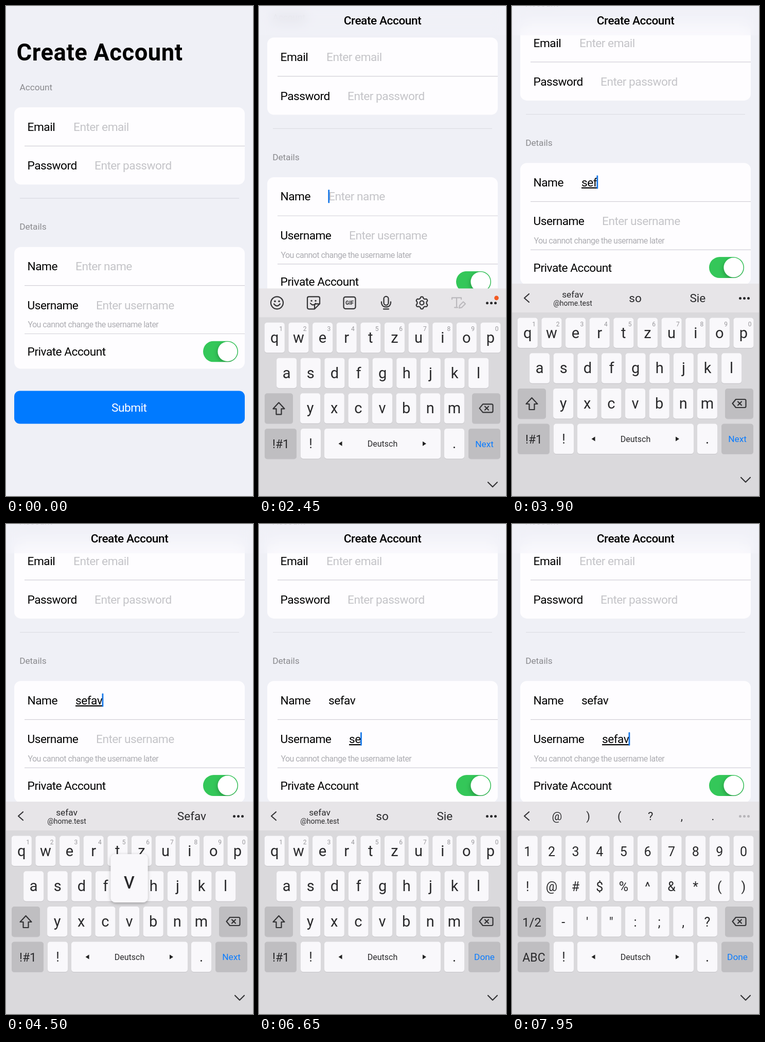
An HTML page for the animation above (8 s loop, 480 by 953 pixels).

```html
<!DOCTYPE html>
<html lang="en">
<head>
<meta charset="utf-8">
<title>Create Account</title>
<style>
html, body { margin: 0; width: 100%; height: 100%; overflow: hidden; background: #eff0f6; }
#stage { position: relative; width: 480px; height: 953px; overflow: hidden; font-family: Roboto, sans-serif; }
svg { position: absolute; left: 0; top: 0; font-family: Roboto, sans-serif; }
#bar { position: absolute; left: 0; top: 0; width: 480px; height: 57px; opacity: 0;
  background: rgba(243, 243, 249, .4); backdrop-filter: blur(13px); }
#barTitle { font-size: 22.67px; font-weight: 500; letter-spacing: -.45px; text-anchor: middle; }
.body { font-size: 22.67px; letter-spacing: -.5px; }
.head { font-size: 17.33px; fill: #8a8a8e; letter-spacing: -.1px; }
.hint { fill: #c4c4c8; }
.typed { text-decoration: underline; }
.mid { text-anchor: middle; fill: #29292b; }
.icon { fill: none; stroke: #333335; stroke-width: 2.2; stroke-linecap: round; stroke-linejoin: round; }
</style>
</head>
<body>
<div id="stage">
  <svg width="480" height="953">
    <defs>
      <filter id="soft" x="-30%" y="-30%" width="160%" height="160%">
        <feDropShadow dx="0" dy="2" stdDeviation="3" flood-opacity=".28"/>
      </filter>
      <filter id="knob" x="-40%" y="-40%" width="180%" height="180%">
        <feDropShadow dx="-1" dy="3" stdDeviation="4" flood-opacity=".25"/>
      </filter>
      <clipPath id="track"><rect x="383" y="651.5" width="68" height="41" rx="20.5"/></clipPath>
    </defs>
    <g id="page">
      <text x="20.6" y="106" font-size="45.33" font-weight="700" letter-spacing=".55">Create Account</text>
      <text class="head" x="26.6" y="164">Account</text>
      <text class="head" x="26.2" y="435.3">Details</text>
      <g fill="#fefdff">
        <rect x="16" y="197" width="448" height="150.3" rx="13"/>
        <rect x="16" y="468.7" width="448" height="236.8" rx="13"/>
      </g>
      <path d="M36 272.3H464M36 543.7H464M36 637.5H464" stroke="#d1d0d7" stroke-width="1.2"/>
      <path d="M27 374H453" stroke="#dddee4" stroke-width="1.3"/>
      <g class="body" id="labels"></g>
      <text x="42.4" y="625.3" font-size="16" letter-spacing="-.547" fill="#adadb2">You cannot change the username later</text>
      <g clip-path="url(#track)">
        <rect x="383" y="651.5" width="68" height="41" fill="#34c759"/>
        <circle cx="430.5" cy="672" r="19" fill="#fff" filter="url(#knob)"/>
      </g>
      <rect x="16" y="748.5" width="448" height="64" rx="11" fill="#007aff"/>
      <text class="body" x="239.3" y="788.7" text-anchor="middle" style="fill:#fff">Submit</text>
      <rect id="caret" width="2.8" height="26" rx="1" fill="#1677e8"/>
    </g>
  </svg>
  <div id="bar"></div>
  <svg width="480" height="953">
    <text id="barTitle" x="240" y="36">Create Account</text>
    <g id="keyboard">
      <rect y="540" width="480" height="57" fill="#e7e5e8"/>
      <rect y="596" width="480" height="357" fill="#dad9dc"/>
      <g id="strip"></g>
      <g id="keys"></g>
      <path class="icon" d="M445 917l9 9 9-9"/>
      <g id="popup"></g>
    </g>
  </svg>
</div>
<script>
const $ = id => document.getElementById(id);
const LOOP = 8000, SCROLL = 163.4, WORD = 'sefav', CAP = 'Sefav';
const FIELDS = [
  { id: 'name', x: 135, y: 514, times: [3350, 3550, 3780, 4150, 4450], from: 2150, to: 5300 },
  { id: 'user', x: 175, y: 589.5, times: [6250, 6500, 6800, 7150, 7500], from: 5300, to: LOOP }
];
const STRIPS = [[0, 'icons'], [3350, 'short'], [4200, 'long'], [4700, 'done'], [5300, 'icons'],
  [6250, 'short'], [7150, 'long'], [7550, 'done'], [7850, 'symbols']];
const CARET = [[0, 0], [2150, 1], [3050, 0], [3350, 1], [5000, 0], [5300, 1], [5750, 0], [6250, 1]];
const LETTERS = ['qwertzuiop', 'asdfghjkl', 'yxcvbnm'];
const SYMBOLS = ['1234567890', '!@#$%^&*()', '-\'":;,?'];
const ROW_Y = [606.5, 675.3, 744, 812.6], STEP = 46.63;

const esc = s => s.replace(/&/g, '&amp;').replace(/</g, '&lt;');
const text = (s, x, y, size, extra = '') =>
  `<text class="mid" x="${x}" y="${y}" font-size="${size}" ${extra}>${esc(s)}</text>`;
const key = (x, y, w, fill = '#f9f8fb') =>
  `<rect x="${x}" y="${y + 1}" width="${w}" height="58.5" rx="5" fill="#c5c4c8"/>` +
  `<rect x="${x}" y="${y}" width="${w}" height="58.5" rx="5" fill="${fill}"/>`;
const at = (table, t) => table.filter(([start]) => start <= t).pop();
const progress = (t, start, length) => Math.min(1, Math.max(0, (t - start) / length));
const easeOut = p => 1 - (1 - p) ** 3;

const rowStart = (rows, r) => r === 2 ? 99.6 : rows[r].length === 10 ? 30.3 : 53.6;

function keysMarkup(symbols, action, pressed) {
  const rows = symbols ? SYMBOLS : LETTERS;
  const grey = name => name === pressed ? '#a9a8ab' : '#bfbec1';
  let out = '';
  rows.forEach((row, r) => [...row].forEach((c, i) => {
    const x = rowStart(rows, r) + i * STEP, y = ROW_Y[r];
    out += key(x - 19.5, y, 39) + text(c, x, y + 39, symbols ? 25 : 29);
    if (!symbols && r === 0)
      out += text(String((i + 1) % 10), x + 12.2, y + 16, 12, 'style="fill:#98979b"');
  }));
  out += key(11, ROW_Y[2], 55, grey()) + key(414, ROW_Y[2], 55, grey());
  out += symbols ? text('1/2', 38.5, 782.5, 24)
    : '<path class="icon" d="M38.5 762l-11 12h6v11h10v-11h6z"/>';
  out += '<path class="icon" d="M435 765h17q2.500 0 2.500 2.500v11q0 2.500-2.500 2.500h-17l-6.500-8zM439 769.500l7 7m0-7l-7 7"/>';
  const y = ROW_Y[3];
  out += key(11, y, 62, grey('mode')) + key(81, y, 39) + key(127, y, 226) + key(360, y, 39) + key(407, y, 62, grey('action'));
  out += text(symbols ? 'ABC' : '!#1', 42.500, 850.5, 23) + text('!', 100.500, 851, 25) + text('.', 379.500, 851, 27);
  out += text('Deutsch', 240, 848, 16) + text(action, 438, 848.3, 17.3, 'style="fill:#0a7cff"');
  return out + '<path d="M154.500 842l7-4.500v9zM325 842l-7-4.500v9z" fill="#222"/>';
}

const dots = color => [443.5, 451.5, 459.5].map(x => `<circle cx="${x}" cy="568.5" r="2.5" fill="${color}"/>`).join('');

function gear() {
  const points = Array.from({ length: 72 }, (_, i) => {
    const a = i * Math.PI / 36, r = 10.4 + 1.5 * Math.tanh(2 * Math.cos(6 * a + Math.PI));
    return `${(316.5 + r * Math.cos(a)).toFixed(1)},${(568 + r * Math.sin(a)).toFixed(1)}`;
  });
  return `<polygon points="${points.join(' ')}"/><circle cx="316.5" cy="568" r="4"/>`;
}

function stripMarkup(mode) {
  if (mode === 'icons') return `<g class="icon">
    <circle cx="35" cy="568" r="12"/><path d="M29 570q6 8 12 0"/>
    <path d="M97 556h18q3 0 3 3v11l-10 10h-11q-3 0-3-3v-18q0-3 3-3zM118 570h-7q-3 0-3 3v7M100 569q5 6 10 0"/>
    <rect x="164.500" y="556.500" width="23" height="23" rx="3.500"/>
    <rect x="242.500" y="555.500" width="9" height="17" rx="4.500"/><path d="M238 566v2q1 8 9 8t9-8v-2M242 580h10"/>
    ${gear()}
    <path stroke="#bbb9bd" d="M375 561v-3h18v3M384 558v19M380 577h6M389 578l1-5 7-7 4 4-7 7z"/></g>
    <g fill="#333335"><circle cx="31" cy="565" r="1.800"/><circle cx="39" cy="565" r="1.800"/>
    <circle cx="102" cy="564" r="1.700"/><circle cx="110" cy="564" r="1.700"/></g>
    ${text('GIF', 176, 571.8, 10.5, 'font-weight="700"')}${dots('#29292b')}
    <circle cx="461.500" cy="558.500" r="4.300" fill="#f25a22"/>`;
  const back = '<path class="icon" d="M33 560l-9 8 9 8"/>';
  if (mode === 'symbols')
    return back + dots('#b7b5b9') + [...'@)(?,.'].map((c, i) => text(c, 87.5 + i * 60.6, 576, 22)).join('');
  const address = text(WORD, 118, 567, 17.3) + text('@home.test', 118, 583, 14);
  const words = { short: ['', 'so', 'Sie'], long: ['', '', CAP], done: [CAP, '', CAP + 's'] }[mode];
  return back + dots('#29292b') + (words[0] ? '' : address) +
    words.map((w, i) => text(w, 118.3 + i * 121.3, 576, 22.6)).join('');
}

function popupMarkup(c) {
  if (!c) return '';
  const r = LETTERS.findIndex(row => row.includes(c));
  const x = rowStart(LETTERS, r) + LETTERS[r].indexOf(c) * STEP, y = ROW_Y[r] - 102;
  return `<rect x="${x - 36}" y="${y}" width="72" height="94" rx="9" fill="#f9f8fb" filter="url(#soft)"/>` +
    text(c, x, y + 67, 45);
}

$('labels').innerHTML = [
  ['Email', 243, 131, 'Enter email'], ['Password', 318.3, 172, 'Enter password'],
  ['Name', 514, 135, 'Enter name', 'name'], ['Username', 589.5, 175, 'Enter username', 'user'],
  ['Private Account', 680, 0, '']
].map(([label, y, x, hint, id]) =>
  `<text x="41.600" y="${y}">${label}</text><text ${id ? `id="${id}"` : ''} class="hint" x="${x}" y="${y}">${hint}</text>`).join('');
FIELDS.forEach(f => f.hint = $(f.id).textContent);

const last = {};
function update(slot, state, draw) {
  if (last[slot] === state) return;
  last[slot] = state;
  draw();
}

function render(t) {
  const shift = SCROLL * easeOut(progress(t, 2250, 450));
  const rise = easeOut(progress(t, 2200, 350));
  const barShown = progress(shift, 45, 40);
  $('page').setAttribute('transform', `translate(0 ${-shift})`);
  $('keyboard').setAttribute('transform', `translate(0 ${413 * (1 - rise)})`);
  $('bar').style.opacity = barShown;
  $('barTitle').style.opacity = barShown;

  let pressedLetter = '';
  for (const f of FIELDS) {
    const node = $(f.id), count = f.times.filter(time => time <= t).length;
    const active = t >= f.from && t < f.to;
    update(f.id, `${count}${active}`, () => {
      node.textContent = count ? WORD.slice(0, count) : f.hint;
      node.setAttribute('class', !count ? 'hint' : active ? 'typed' : '');
    });
    const hit = f.times.findIndex(time => t >= time - 100 && t < time + 100);
    if (hit >= 0) pressedLetter = WORD[hit];
    if (active) {
      const width = count ? node.getComputedTextLength() : 0;
      $('caret').setAttribute('x', f.x + width - .7);
      $('caret').setAttribute('y', f.y - 21);
    }
  }
  const [since, on] = at(CARET, t);
  $('caret').style.opacity = on || (since ? 1 - progress(t, since, 130) : 0);

  const strip = at(STRIPS, t)[1];
  update('strip', strip, () => $('strip').innerHTML = stripMarkup(strip));
  const symbols = t >= 7850, action = t < 5350 ? 'Next' : 'Done';
  const pressed = t >= 5250 && t < 5350 ? 'action' : t >= 7700 && t < 7850 ? 'mode' : 'none';
  update('keys', symbols + action + pressed, () => $('keys').innerHTML = keysMarkup(symbols, action, pressed));
  update('popup', pressedLetter, () => $('popup').innerHTML = popupMarkup(pressedLetter));
}

const start = performance.now();
function frame() {
  render((performance.now() - start) % LOOP);
  requestAnimationFrame(frame);
}
frame();
</script>
</body>
</html>
```
